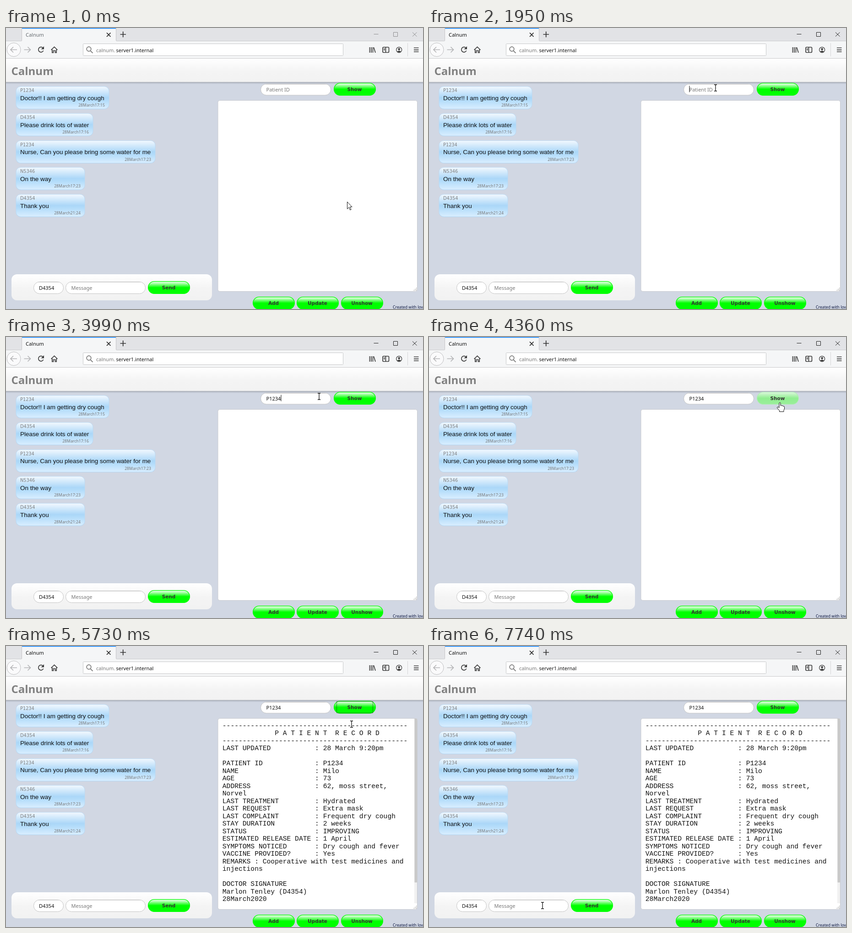
Recreate the animation shown at these times as an HTML page. Size 911 by 615 pixels, loop 8000 ms.

```html
<!DOCTYPE html>
<html lang="en">
<head>
<meta charset="utf-8">
<title>Patient chat</title>
<style>
  html, body { margin: 0; width: 100%; height: 100%; overflow: hidden; background: #d1d7e3; }
  svg { display: block; width: 100vw; height: 100vh; }
  text { white-space: pre; font: 11px "Noto Sans", "Open Sans", sans-serif; }
  .line { fill: none; stroke: #3c3c3c; stroke-width: 1.7; }
  .soft { stroke: #b4b4b6; }
  .thin { stroke-width: 1; }
  text.label { font: bold 10.5px "DejaVu Sans", sans-serif; fill: #333; text-anchor: middle; }
  text.who { font: 9.8px "DejaVu Sans", sans-serif; fill: #808080; }
  text.say { font: 13.45px "Liberation Sans", Arial, sans-serif; fill: #111; }
  text.when { font-size: 8.7px; fill: #777; text-anchor: end; }
  text.mono { font: 14.667px "Liberation Mono", monospace; fill: #111; }
  text.hint { fill: #767676; }
</style>
</head>
<body>
<svg id="stage" viewBox="0 0 911 615" preserveAspectRatio="none">
  <defs>
    <linearGradient id="bubble" x2="0" y2="1">
      <stop offset="0" stop-color="#f2f8fe"/><stop offset=".5" stop-color="#abd7f8"/>
      <stop offset=".62" stop-color="#b3dcfa"/><stop offset="1" stop-color="#d9eeff"/>
    </linearGradient>
    <linearGradient id="green" x2="0" y2="1">
      <stop offset="0" stop-color="#e2ffe2"/><stop offset=".12" stop-color="#c4ffc4"/>
      <stop offset=".5" stop-color="#0f0"/><stop offset="1" stop-color="#0f0"/>
    </linearGradient>
    <linearGradient id="pale" x2="0" y2="1">
      <stop offset="0" stop-color="#dcf8dc"/><stop offset=".5" stop-color="#90ee90"/>
      <stop offset="1" stop-color="#9aee9a"/>
    </linearGradient>
    <linearGradient id="header" x2="0" y2="1">
      <stop offset="0" stop-color="#fff"/><stop offset=".55" stop-color="#f4f4f4"/>
      <stop offset="1" stop-color="#f2f2f2"/>
    </linearGradient>
    <linearGradient id="fade" x2="0" y2="1">
      <stop offset="0" stop-color="#8b909b" stop-opacity=".65"/><stop offset="1" stop-color="#8b909b" stop-opacity="0"/>
    </linearGradient>
  </defs>
</svg>
<script>
const LOOP = 8000;
const stage = document.getElementById('stage');

function add(tag, attrs, parent = stage) {
  const node = document.createElementNS('http://www.w3.org/2000/svg', tag);
  for (const key in attrs) node.setAttribute(key, attrs[key]);
  return parent.appendChild(node);
}
const rect = (x, y, width, height, fill, more, parent) =>
  add('rect', { x, y, width, height, fill, ...more }, parent);
const line = (d, cls = '', more, parent) => add('path', { d, class: 'line ' + cls, ...more }, parent);
function write(x, y, content, attrs, parent) {
  const node = add('text', { x, y, ...attrs }, parent);
  node.textContent = content;
  return node;
}
const show = (node, on) => node.setAttribute('visibility', on ? 'visible' : 'hidden');

// Browser window
rect(0, 0, 911, 29, '#e2e3e6');
line('M0 28.5H911', 'thin', { style: 'stroke:#ccccce' });
rect(34, 0, 207, 30, '#f5f6f7');
line('M34.5 0V28M240.5 0V28', 'thin', { style: 'stroke:#c6c6c8' });
rect(35, 0, 205, 1.5, '#0a84ff');
rect(0, 29, 911, 38, '#f5f6f7');
const tabTitle = write(43, 19, 'Calnum', { 'font-size': 10.8 });
line('M220 10.5L228.500 19M228.500 10.500L220 19', '', { style: 'stroke:#222' });
line('M249.500 14H262M255.700 7.800V20.200', '', { style: 'stroke:#333' });
const controls = line('M803.500 13.500H813.500M846.500 9.500H855.500V18.500H846.500ZM888 9.500L897.500 18.500M897.500 9.500L888 18.500', 'thin');

add('circle', { cx: 17, cy: 47.500, r: 15, fill: '#fafafb', stroke: '#bdbdbf' });
line('M24 47.500H10.500M16 41.500L10 47.500L16 53.500', 'soft');
line('M39.500 47.500H53M47.500 41.500L53.500 47.500L47.500 53.500', 'soft');
line('M81 44A5.600 5.600 0 1 0 81.600 49.500');
add('path', { d: 'M83 40V46.500H76.500Z', fill: '#3c3c3c' });
line('M98.500 48L105.500 41.500L112.500 48M100.800 47V54H103.500V49.500H107.500V54H110.200V47');
rect(168.500, 34.500, 568, 26, '#fff', { stroke: '#c7c8ca', rx: 1 });
add('circle', { cx: 181, cy: 46, r: 4.800, class: 'line', style: 'stroke:#777' });
line('M184.500 49.800L189.500 54.800', '', { style: 'stroke:#777' });
write(197, 52.500, 'calnum.', { 'font-size': 11.6, fill: '#777' });
write(240.500, 52.500, 'server1.internal', { 'font-size': 11.6, fill: '#111' });

line('M794.500 42V54M798 42V54M801.500 42V54M803.500 42.500L807 54', '', { 'stroke-width': 1.5 });
rect(823, 42, 13.500, 11.500, 'none', { class: 'line', rx: 2 });
line('M829.500 42V53.500M825 45.500H828M825 48H828');
add('circle', { cx: 858.700, cy: 47.800, r: 6, class: 'line', style: 'stroke-width:1.300' });
add('circle', { cx: 858.700, cy: 46.200, r: 2.300, fill: '#3c3c3c' });
add('path', { d: 'M854.700 51.500Q858.700 47.500 862.700 51.500Q858.700 54.500 854.700 51.500', fill: '#3c3c3c' });
line('M877.500 33V62', 'thin', { style: 'stroke:#d5d5d7' });
line('M891 43.500H901.500M891 47.800H901.500M891 52H901.500');

// Page
rect(0, 67, 911, 52, 'url(#header)');
line('M0 66.500H911', 'thin', { style: 'stroke:#c9c9cb' });
rect(0, 118, 911, 5, 'url(#fade)');
write(11.500, 102.500, 'Calnum', { style: 'font-size:24px;font-weight:bold', fill: '#808080' });

const messages = [
  [128, 203, 'P1234', 'Doctor!! I am getting dry cough', '17:15'],
  [187, 168, 'D4354', 'Please drink lots of water', '17:16'],
  [246.500, 304, 'P1234', 'Nurse, Can you please bring some water for me', '17:23'],
  [305, 150, 'N5346', 'On the way', '17:23'],
  [364, 150, 'D4354', 'Thank you', '21:24']
];
for (const [y, width, who, say, when] of messages) {
  rect(22, y + .8, width, 49, '#a5c9e8', { rx: 10, opacity: .6 });
  rect(22, y, width, 49, 'url(#bubble)', { rx: 10, stroke: '#b5daf6', 'stroke-width': .8 });
  write(31, y + 12, who, { class: 'who' });
  write(31, y + 29.500, say, { class: 'say' });
  write(13 + width, y + 44, '28March' + when, { class: 'when' });
}

rect(12, 539, 438, 57, 'url(#header)', { rx: 12 });

function field(x, y, width, height) {
  rect(x + .5, y + .5, width - 1, height - 1, '#fff', { rx: height / 2 - .5, stroke: '#c4c4c4' });
  line(`M${x + 11} ${y + 1.300}H${x + width - 11}`, 'thin', { style: 'stroke:#d4d4d4' });
}
field(60, 555, 66, 27);
write(72, 573, 'D4354', { fill: '#111' });
field(130, 555, 175, 27);
write(142.500, 573, 'Message', { class: 'hint' });
field(556, 122, 154, 25.500);
const patient = write(568.500, 138.500, '');

function button(x, y, label) {
  const group = add('g', { transform: `translate(${x} ${y})` });
  const face = rect(.6, .6, 90.800, 26.800, 'url(#green)', { rx: 13.400, stroke: '#0f0', 'stroke-width': 1.200 }, group);
  const text = write(45.500, 18.300, label, { class: 'label' }, group);
  return { group, face, text };
}
button(310, 554, 'Send');
const showButton = button(716, 120, 'Show');
button(539, 588, 'Add');
button(635, 588, 'Update');
button(732, 588, 'Unshow');
const focusRing = rect(6.500, 1.500, 79, 25, 'none',
  { stroke: '#111', 'stroke-dasharray': '1 1' }, showButton.group);
write(845, 613.500, 'Created with love', { style: 'font-size:8.700px', fill: '#0c1640' });

rect(463, 158.500, 435.500, 418, '#fff', { rx: 4, stroke: '#c9cbd0' });
for (let row = 0; row < 3; row++)
  for (let col = 2 - row; col < 3; col++)
    rect(890.500 + col * 2.700, 568.500 + row * 2.500, 1.300, 1.300, '#999');

// Patient record
const record = add('g', {});
rect(892, 159, 6, 404, '#f1f1f1', {}, record);
rect(892.500, 159, 5.500, 358.500, '#c9c9c9', {}, record);
const rule = '-'.repeat(46);
const entry = (name, value) => name.padEnd(23) + ': ' + value;
[
  rule, ' '.repeat(13) + 'P A T I E N T  R E C O R D', rule,
  entry('LAST UPDATED', '28 March 9:20pm'), '',
  entry('PATIENT ID', 'P1234'),
  entry('NAME', 'Milo'),
  entry('AGE', '73'),
  entry('ADDRESS', '62, moss street,'), 'Norvel',
  entry('LAST TREATMENT', 'Hydrated'),
  entry('LAST REQUEST', 'Extra mask'),
  entry('LAST COMPLAINT', 'Frequent dry cough'),
  entry('STAY DURATION', '2 weeks'),
  entry('STATUS', 'IMPROVING'),
  entry('ESTIMATED RELEASE DATE', '1 April'),
  entry('SYMPTOMS NOTICED', 'Dry cough and fever'),
  entry('VACCINE PROVIDED?', 'Yes'),
  'REMARKS : Cooperative with test medicines and', 'injections', '',
  'DOCTOR SIGNATURE', 'Marlon Tenley (D4354)', '28March2020'
].forEach((row, i) => write(472.800, 178.800 + i * 16.500, row, { class: 'mono' }, record));

const patientCaret = rect(568, 126.500, 1, 14, '#111');
const messageCaret = rect(143, 561.500, 1, 14, '#111');

// Pointer shapes, each with its hot spot at 0,0
const pointer = add('g', {});
const outline = d => add('path', { d, fill: '#fff', stroke: '#111', 'stroke-linejoin': 'round' }, pointer);
const shapes = {
  arrow: outline('M.500 .500V16L4.200 12.500L6.600 18.300L9 17.300L6.500 11.600H11Z'),
  beam: line('M-3 -7H-1L0 -6L1 -7H3M0 -6V6M-3 7H-1L0 6L1 7H3', '', { style: 'stroke:#111;stroke-width:1.300' }, pointer),
  hand: outline('M-2 12V2Q-2 .500 -.500 .500T1 2V7Q2.500 6 4 7.500Q6 6.800 7 8.500Q9.500 8 9.500 10.500V14L8 17.500V20.500H-1.500V18L-6.500 12Q-6.500 9.500 -4 10Z')
};

// Timelines: [time, value]
const typing = [[0, ''], [2250, 'P'], [2680, 'P1'], [2910, 'P12'], [3140, 'P123'], [3630, 'P1234']];
const blink = [[0, 0], [910, 1], [1420, 0], [1950, 1], [2510, 0], [2680, 1], [3530, 0],
  [3630, 1], [4130, 0], [4600, 1], [4800, 0], [7240, 2], [7740, 0]];
const path = [
  [0, 745, 380], [20, 745, 380], [180, 729, 330], [400, 660, 195], [590, 616, 127], [810, 626, 131],
  [3850, 626, 131], [3990, 684, 130], [4090, 725, 125], [4300, 768, 145], [4600, 764, 137],
  [5720, 764, 137], [5730, 755, 170], [5900, 748, 260], [6300, 747, 384],
  [6450, 747, 385], [6540, 545, 418], [6640, 298, 458], [6760, 258, 535], [6910, 248, 568], [LOOP, 248, 568]
];
const current = (table, t) => table.reduce((value, step) => t >= step[0] ? step[1] : value, table[0][1]);

function position(t) {
  const next = path.findIndex(step => step[0] > t);
  const [t0, x0, y0] = path[next - 1], [t1, x1, y1] = path[next];
  const k = (t - t0) / (t1 - t0);
  return [x0 + (x1 - x0) * k, y0 + (y1 - y0) * k];
}
const inside = (x, y, [left, top, right, bottom]) => x >= left && x <= right && y >= top && y <= bottom;
const fields = [[556, 122, 710, 148], [463, 159, 891, 577], [130, 555, 305, 582]];

function render(t) {
  const [x, y] = position(t);
  const hover = inside(x, y, [716, 120, 808, 148]);
  const shape = hover ? 'hand' : t >= 20 && fields.some(box => inside(x, y, box)) ? 'beam' : 'arrow';
  pointer.setAttribute('transform', `translate(${Math.round(x)} ${Math.round(y)})`);
  for (const name in shapes) show(shapes[name], name === shape);

  const active = t >= 910;
  tabTitle.setAttribute('fill', active ? '#111' : '#666b70');
  controls.style.stroke = active ? '#222' : '#8f8f91';

  const typed = current(typing, t);
  patient.textContent = typed || 'Patient ID';
  patient.setAttribute('fill', typed ? '#111' : '#767676');
  patientCaret.setAttribute('x', 568.500 + (typed ? Math.round(patient.getComputedTextLength()) : 0));
  const caret = current(blink, t);
  show(patientCaret, caret === 1);
  show(messageCaret, caret === 2);

  const pressed = t >= 4800 && t < 4970;
  showButton.face.setAttribute('fill', hover ? 'url(#pale)' : 'url(#green)');
  showButton.face.setAttribute('stroke', hover ? '#b4e9bb' : '#0f0');
  showButton.text.setAttribute('x', pressed ? 46.500 : 45.500);
  focusRing.setAttribute('x', pressed ? 7.500 : 6.500);
  show(focusRing, t >= 4800 && t < 7170);
  show(record, t >= 4970);
}

const start = performance.now();
function tick() {
  render((performance.now() - start) % LOOP);
  requestAnimationFrame(tick);
}
tick();
</script>
</body>
</html>
```
